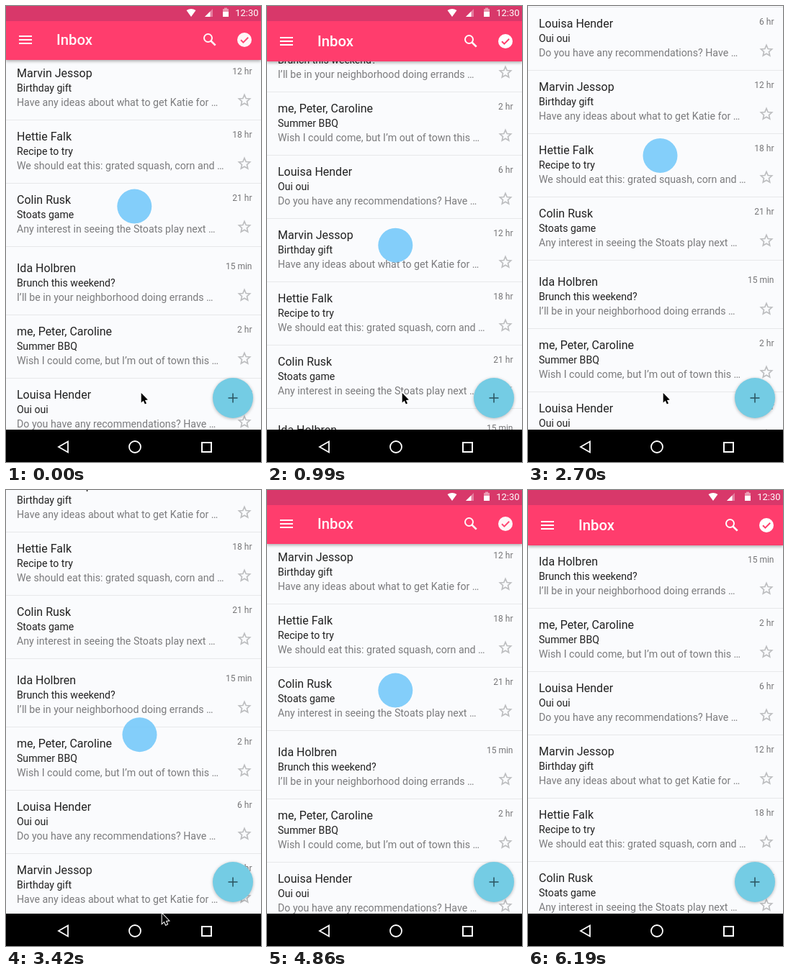
These frames come from a looping animation (354 px wide and 634 px high, 9.04 s). An HTML page with a canvas:

```html
<!DOCTYPE html>
<html lang="en">
<head>
<meta charset="utf-8">
<title>Inbox scroll</title>
<style>
html, body { margin: 0; width: 100%; height: 100%; overflow: hidden; background: #000; }
canvas { display: block; width: 354px; height: 634px; }
</style>
</head>
<body>
<canvas id="stage" width="354" height="634"></canvas>
<script>
const c = document.getElementById('stage').getContext('2d');
const LOOP = 9040, SHIFT = 4850, ROW = 88, GROUP = 535, REST = 99;
const PINK = '#ff3d6d', WHITE = '#fff';

const mails = [
  ['Ida Holbren', 'Brunch this weekend?', 'I’ll be in your neighborhood doing errands …', '15 min'],
  ['me, Peter, Caroline', 'Summer BBQ', 'Wish I could come, but I’m out of town this …', '2 hr'],
  ['Louisa Hender', 'Oui oui', 'Do you have any recommendations? Have …', '6 hr'],
  ['Marvin Jessop', 'Birthday gift', 'Have any ideas about what to get Katie for …', '12 hr'],
  ['Hettie Falk', 'Recipe to try', 'We should eat this: grated squash, corn and …', '18 hr'],
  ['Colin Rusk', 'Stoats game', 'Any interest in seeing the Stoats play next …', '21 hr']
];

// Each drag: finger down, start of movement, x, first y, last y
const drags = [
  [2070, 2167, 183.5, 459, 208],
  [3060, 3128, 185.5, 459, 254],
  [4410, 4464, 178.3, 93, 317],
  [5390, 5464, 178.3, 145.7, 377.7]
];
const DRAG = 530, FADE = 185;

const clamp = v => Math.max(0, Math.min(1, v));
const ease = v => (1 - Math.cos(Math.PI * clamp(v))) / 2;

function text(s, x, y, size, color, align = 'left', weight = 400) {
  c.font = `${weight} ${size}px Roboto, sans-serif`;
  c.textAlign = align;
  c.fillStyle = color;
  c.fillText(s, x, y);
}

function rect(x, y, w, h, color) {
  c.fillStyle = color;
  c.fillRect(x, y, w, h);
}

function disc(x, y, r, color) {
  c.beginPath();
  c.arc(x, y, r, 0, 2 * Math.PI);
  c.fillStyle = color;
  c.fill();
}

function trace(points, closed) {
  c.beginPath();
  points.forEach(([x, y]) => c.lineTo(x, y));
  if (closed) c.closePath();
}

function fillShape(points, color) {
  trace(points, true);
  c.fillStyle = color;
  c.fill();
}

function stroke(color, width) {
  c.strokeStyle = color;
  c.lineWidth = width;
  c.stroke();
}

function shadow(blur, y, alpha) {
  c.shadowColor = `rgba(0,0,0,${alpha})`;
  c.shadowBlur = blur;
  c.shadowOffsetY = y;
}

function star(x, y) {
  const points = [];
  for (let i = 0; i < 10; i++) {
    const r = i % 2 ? 3.7 : 8, a = i * Math.PI / 5;
    points.push([x + r * Math.sin(a), y - r * Math.cos(a)]);
  }
  trace(points, true);
  stroke('#bdbec0', 1.7);
}

function list(top) {
  for (let g = 0; g < 3; g++) {
    mails.forEach(([name, subject, preview, time], i) => {
      const y = top + g * GROUP + i * ROW;
      if (y < -70 || y > 600) return;
      text(name, 15, y + 6, 16, '#212121');
      text(subject, 15, y + 26, 14.1, '#212121');
      text(preview, 15, y + 46, 14.2, '#7b7b7d');
      text(time, 341.5, y + 2, 12, '#757577', 'right');
      star(331, y + 38.5);
      rect(0, y + 65, 354, 1, '#e7e8ea');
    });
  }
}

function header(hidden) {
  if (hidden >= 78) return;
  c.save();
  c.translate(0, -hidden);
  c.save();
  shadow(4, 1.5, .3);
  rect(0, 0, 354, 77, PINK);
  c.restore();
  c.globalAlpha = clamp(1 - hidden / 40);
  [43, 48, 53].forEach(y => rect(18, y, 18, 2, WHITE));
  text('Inbox', 70, 56, 20.3, WHITE, 'left', 500);
  c.beginPath();
  c.arc(280.5, 46.5, 5.5, 0, 2 * Math.PI);
  stroke(WHITE, 2);
  trace([[284.5, 50.5], [290.7, 56.7]]);
  stroke(WHITE, 2.6);
  disc(331, 49, 10, WHITE);
  trace([[326, 49.2], [329.4, 52.6], [336.2, 45.8]]);
  stroke(PINK, 2);
  c.restore();
}

function statusBar(y) {
  c.save();
  c.translate(0, y);
  rect(0, 0, 354, 21, '#d8386a');
  c.beginPath();
  c.moveTo(257, 15);
  c.lineTo(250.5, 6);
  c.quadraticCurveTo(257, 2, 263.5, 6);
  c.fillStyle = WHITE;
  c.fill();
  fillShape([[276, 15], [287, 15], [287, 4]], 'rgba(255,255,255,.35)');
  fillShape([[276, 15], [283.5, 15], [283.5, 7.5]], WHITE);
  rect(303, 2.5, 4, 2, 'rgba(255,255,255,.45)');
  rect(301, 4, 8, 4, 'rgba(255,255,255,.45)');
  rect(301, 8, 8, 7, WHITE);
  text('12:30', 350.5, 14, 13, WHITE, 'right');
  c.restore();
}

function addButton() {
  c.save();
  shadow(4, 1, .28);
  disc(315, 545, 28, '#74cce4');
  c.restore();
  rect(308.5, 544.2, 13, 1.6, '#2d5965');
  rect(314.2, 538.5, 1.6, 13, '#2d5965');
}

function navBar() {
  rect(0, 589, 354, 45, '#000');
  trace([[73, 613], [86, 605.5], [86, 620.5]], true);
  stroke(WHITE, 1.8);
  c.beginPath();
  c.arc(179, 613, 8, 0, 2 * Math.PI);
  stroke(WHITE, 1.8);
  c.lineWidth = 2;
  c.strokeRect(272, 607, 13, 13);
}

function cursor(t) {
  const k = Math.max(0, (t - 3150) / 270) ** 2;
  if (k > 2) return;
  c.save();
  c.translate(187.7 + 29 * k, 538 + 51 * k);
  trace([[0, 0], [0, 13.5], [3, 10.8], [5.2, 15.6], [7.3, 14.6], [5.2, 10], [9.2, 9.6]], true);
  stroke(WHITE, 2);
  c.fillStyle = '#000';
  c.fill();
  c.restore();
}

function draw(t) {
  // The opening repeats the later pull down to the top of the list
  const u = t < 2000 ? t + SHIFT : t;
  let top = REST;
  for (const [, start, , from, to] of drags) top += (to - from) * ease((u - start) / DRAG);
  top = Math.round(top);
  const hidden = Math.round(u < 4400 ? Math.min(80, REST - top) : 80 * (1 - ease((u - 4491) / 400)));

  rect(0, 0, 354, 634, '#fafbfd');
  list(top);
  header(hidden);
  statusBar(Math.min(0, 56 - hidden));
  addButton();
  for (const [down, start, x, from, to] of drags) {
    const end = start + DRAG;
    if (u < down || u >= end + FADE) continue;
    c.globalAlpha = .92 * (1 - clamp((u - end) / FADE));
    disc(x, from + (to - from) * ease((u - start) / DRAG), 24, '#79cafa');
    c.globalAlpha = 1;
  }
  navBar();
  cursor(t);
}

// Motion advances in 90 ms steps, then rests
function step(t) {
  if (t >= 6190) return t;
  const base = t < SHIFT ? 0 : SHIFT;
  return base + Math.floor((t - base) / 90) * 90;
}

const began = performance.now();
function tick() {
  draw(step((performance.now() - began) % LOOP));
  requestAnimationFrame(tick);
}
tick();
</script>
</body>
</html>
```
